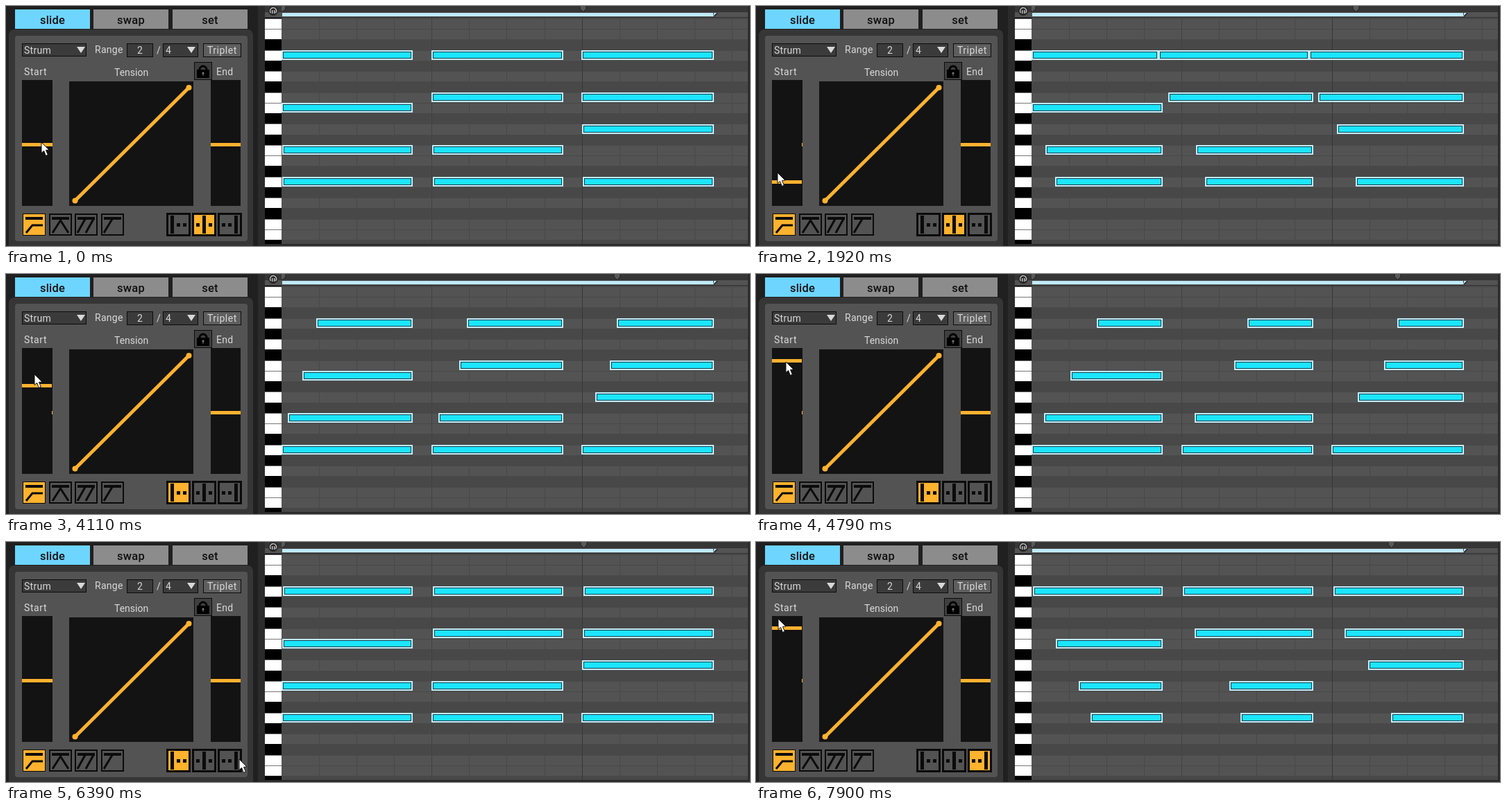
Animation, 1072 px wide and 347 px high, one loop 8 s. Source, as an HTML page with a canvas:

```html
<!DOCTYPE html>
<html lang="en">
<head>
<meta charset="utf-8">
<title>Strum panel</title>
<style>
html, body { margin: 0; width: 100%; height: 100%; overflow: hidden; background: #202020; }
canvas { display: block; }
</style>
</head>
<body>
<canvas id="stage" width="1072" height="347"></canvas>
<script>
const ctx = document.getElementById('stage').getContext('2d');
const LOOP = 8000;
const ORANGE = '#ffb22e', GRAY = '#535353', INK = '#0b0b0b', DARK = '#131313', LIGHT = '#d9d9d9';
const REST_Y = 200, HANDLE_LAG = 90;
const ROW = 15.25, GRID_X = 397;

// Each chord sounds four of these six pitches, counted in rows from the top note.
const pitches = [0, 4, 5, 7, 9, 12];
const chords = [[0, 2, 4, 5], [0, 1, 4, 5], [0, 1, 3, 5]]
  .map((voices, i) => ({ voices, start: 396 + 216.5 * i, end: 585.5 + 217 * i }));

// Strum offset of a voice at full drag: pivot at the middle, bottom or top.
const spread = {
  mid: i => 13.8 * (i - 2.5),
  left: i => 19 * (5 - i),
  right: i => 17.2 * i
};
const fullDrag = { mid: 54, left: -77, right: -76 };

// Where the pointer rests between and during drags: time, x, y
const pointerStops = [[0, 51, 197], [560, 50, 197], [1920, 31, 195], [2610, 38, 197],
  [3140, 249, 311], [3300, 248, 312], [3540, 34, 170], [3680, 40, 196], [4790, 43, 197],
  [5460, 29, 198], [5860, 30, 207], [6260, 336, 314], [6400, 324, 313],
  [6800, 24, 174], [7330, 36, 194], [7900, 32, 197]];

const smooth = k => k * k * (3 - 2 * k);
const mix = (a, b, k) => a + (b - a) * k;

// The picture refreshes at a steady pace, with one pause between two runs.
function lastRefresh(t) {
  if (t < 560) return 0;
  if (t < 4790) return 560 + 136 * Math.min(29, Math.floor((t - 560) / 136));
  return 4790 + 134 * Math.floor((t - 4790) / 134);
}

function wave(t, from, length, height, turns) {
  const k = (t - from) / length;
  return k > 0 && k < 1 ? height * Math.sin(Math.PI * 2 * turns * k) : 0;
}

const swing = t => wave(t, 560, 1610, -56, 1) + wave(t, 3740, 1600, -79, 0.5)
  + wave(t, 7440, 1070, -90, 0.5);

function pointerAt(t) {
  const i = Math.max(1, pointerStops.findIndex(stop => stop[0] > t));
  const [t0, x0, y0] = pointerStops[i - 1], [t1, x1, y1] = pointerStops[i];
  const k = smooth(Math.min(1, (t - t0) / (t1 - t0)));
  return [mix(x0, x1, k), mix(y0, y1, k) + swing(t)];
}

function rect(x, y, w, h, color) {
  ctx.fillStyle = color;
  ctx.fillRect(x, y, w, h);
}

function box(x, y, w, h, fill, border = 1) {
  rect(x, y, w, h, INK);
  rect(x + border, y + border, w - 2 * border, h - 2 * border, fill);
}

function round(x, y, w, h, r, color) {
  ctx.fillStyle = color;
  ctx.beginPath();
  ctx.roundRect(x, y, w, h, r);
  ctx.fill();
}

function trace(points) {
  ctx.beginPath();
  points.forEach(([x, y], i) => i ? ctx.lineTo(x, y) : ctx.moveTo(x, y));
}

function line(points, color, width) {
  trace(points);
  ctx.strokeStyle = color;
  ctx.lineWidth = width;
  ctx.stroke();
}

function shape(points, color) {
  trace(points);
  ctx.closePath();
  ctx.fillStyle = color;
  ctx.fill();
}

function disc(x, y, r, color) {
  ctx.fillStyle = color;
  ctx.beginPath();
  ctx.arc(x, y, r, 0, 7);
  ctx.fill();
}

function arc(x, y, r, from, to, color, width) {
  ctx.beginPath();
  ctx.arc(x, y, r, from, to);
  ctx.strokeStyle = color;
  ctx.lineWidth = width;
  ctx.stroke();
}

function text(s, x, y, { size = 14, weight = 400, color = LIGHT, align = 'left', gap = 0.3 } = {}) {
  ctx.font = `${weight} ${size}px Roboto, sans-serif`;
  ctx.letterSpacing = gap + 'px';
  ctx.textAlign = align;
  ctx.fillStyle = color;
  ctx.fillText(s, x, y);
}

function drawTabs() {
  ['slide', 'swap', 'set'].forEach((label, i) => {
    const x = Math.round(13 + 113.4 * i);
    rect(x, 5, 108, 28, i ? '#8c8c8c' : '#6dd5ff');
    text(label, x + 54, 26, { size: 16.5, weight: 500, color: '#101010', align: 'center', gap: 0.2 });
  });
}

function dropArrow(x) {
  shape([[x, 59], [x + 12, 59], [x + 6, 68]], LIGHT);
}

function drawControls() {
  box(23, 54, 93, 19, '#3b3b3b');
  text('Strum', 26, 68.5);
  dropArrow(102);
  text('Range', 128, 68);
  box(174, 54, 38, 20, '#3b3b3b');
  text('2', 193, 69, { align: 'center' });
  text('/', 217, 69);
  box(226, 54, 51, 20, '#3b3b3b');
  text('4', 230, 69);
  dropArrow(261);
  box(284, 54, 55, 20, '#5e5e5e');
  text('Triplet', 290, 69, { gap: 0.5 });
  text('Start', 26, 99.5, { gap: 0.6 });
  text('Tension', 156, 101, { gap: 0 });
  text('End', 303, 99.5);

  box(271, 81, 26, 26, '#3f3f3f');
  rect(275, 92, 18, 12, '#000');
  arc(284, 92, 5, Math.PI, 0, '#000', 3);
  disc(284, 97, 1.6, '#777');
  rect(283.5, 97, 1, 4, '#777');
}

function drawShapeButtons() {
  const strokes = [
    [[[5, 28], [14, 17], [29, 17]]],
    [[[5, 28], [16.5, 10], [28, 28]]],
    [[[4, 28], [15, 8]], [[16, 28], [27, 8]]],
    [[[4, 28], [16, 8]]]
  ];
  strokes.forEach((paths, i) => {
    const x = Math.round(24 + 37.7 * i);
    box(x, 300, 33, 32, i ? GRAY : ORANGE, i ? 2 : 1);
    rect(x + 4, 305, 25, 4, INK);
    for (const path of paths) line(path.map(([px, py]) => [x + px, 300 + py]), INK, 3);
  });
}

function drawAlignButtons(mode) {
  ['left', 'mid', 'right'].forEach((name, i) => {
    const x = 231 + 37 * i;
    box(x, 299, 35, 34, name === mode ? ORANGE : GRAY, 3);
    for (let slot = 0; slot < 3; slot++) {
      const sx = x + 6 + 9 * slot;
      slot === i ? rect(sx, 303, 5, 26, INK) : rect(sx, 314, 5, 5, INK);
    }
  });
}

function drawPanel(mode, handle) {
  round(4, 34, 352, 330, 8, '#363636');
  round(13, 43, 335, 297, 4, GRAY);
  drawTabs();
  drawControls();

  rect(23, 107, 44, 182, DARK);
  rect(91, 109, 179, 180, DARK);
  rect(295, 107, 43, 182, DARK);
  line([[99.5, 281.5], [263.5, 118]], ORANGE, 5);
  disc(99.5, 281.5, 4, ORANGE);
  disc(263.5, 118, 4, ORANGE);
  rect(295, 198, 43, 5, ORANGE);
  rect(66, 198, 1, 5, ORANGE);
  rect(23, Math.round(handle) - 2, 43, 5, ORANGE);

  drawShapeButtons();
  drawAlignButtons(mode);
}

function drawRoll() {
  rect(363, 0, 709, 347, '#2b2b2b');
  rect(373, 0, 696, 344, GRAY);
  for (let k = -4; k < 19; k++) {
    const y = Math.max(17, Math.round(63.5 + ROW * k));
    const h = Math.min(344, Math.round(63.5 + ROW * (k + 1))) - y;
    const black = [1, 3, 6, 8, 11].includes((k + 12) % 12);
    rect(373, y, 24, h, black ? '#000' : '#fff');
    rect(373, y, 24, 1, black ? '#000' : '#777');
    rect(GRID_X, y, 672, h, black ? '#484848' : GRAY);
    rect(GRID_X, y, 672, 1, '#494949');
  }
  for (let i = 1; i <= 12; i++) {
    const x = Math.round(396.5 + 54.15 * i);
    rect(x, 17, 1, 327, i === 8 ? '#363636' : i === 4 ? '#424242' : '#484848');
  }
  rect(373, 0, 696, 9, '#363636');
  rect(373, 16, 696, 1, '#333');
  rect(398, 10, 622, 5, '#bfeafb');
  shape([[1019, 10], [1026, 10], [1020, 16]], '#1c1c1c');
  shape([[1020, 10], [1024, 10], [1020, 14]], '#bfeafb');

  disc(385, 7, 7, '#262626');
  arc(385, 7, 4.5, 2.4, 7, '#bbb', 1.5);
  rect(383, 6, 1.5, 5, '#bbb');
  rect(386, 6, 1.5, 5, '#bbb');
}

function drawMarker(x) {
  const points = [[x - 4.5, -1], [x + 4.5, -1], [x + 4.5, 4], [x, 8.5], [x - 4.5, 4], [x - 4.5, -1]];
  shape(points, '#585858');
  line(points, '#1f1f1f', 1);
}

function drawNote(x, end, pitch) {
  const y = Math.round(63.8 + ROW * pitch);
  rect(x, y, end - x, 14, '#c3edfb');
  rect(x + 2, y + 2, end - x - 4, 10, '#123f4b');
  rect(x + 3, y + 3, end - x - 6, 8, '#1be5ff');
}

function drawNotes(t, mode, handle) {
  const drag = (handle - REST_Y) / fullDrag[mode];
  const idle = t < 560 ? spread.right : spread.left;
  const startOf = (chord, voice) =>
    Math.max(GRID_X, Math.round(chord.start + spread[mode](voice) * drag + idle(voice) * 0.027));

  chords.forEach((chord, i) => {
    const next = chords[i + 1];
    for (const voice of chord.voices) {
      const end = next && next.voices.includes(voice)
        ? Math.min(chord.end, startOf(next, voice)) : chord.end;
      drawNote(startOf(chord, voice), Math.round(end), pitches[voice]);
    }
  });
  const last = chords[2];
  drawMarker(Math.max(...last.voices.map(voice => startOf(last, voice))) + 0.5);

  ctx.save();
  ctx.beginPath();
  ctx.rect(GRID_X, 0, 12, 10);
  ctx.clip();
  drawMarker(398.5);
  ctx.restore();
}

function drawPointer([x, y]) {
  const points = [[0, 0], [0, 15.5], [3.6, 12.4], [6.4, 19.5], [9.4, 18.2], [6.5, 11.4], [11, 11], [0, 0]]
    .map(([px, py]) => [Math.round(x) + px, Math.round(y) + py]);
  shape(points, '#fff');
  line(points, '#111', 1);
}

function draw(now) {
  const t = lastRefresh(now % LOOP);
  const mode = t < 3280 ? 'mid' : t < 6390 ? 'left' : 'right';
  const handle = REST_Y + swing(t - HANDLE_LAG);
  rect(0, 0, 1072, 347, '#202020');
  drawPanel(mode, handle);
  drawRoll();
  drawNotes(t, mode, handle);
  drawPointer(pointerAt(t));
}

const origin = performance.now();
function frame() {
  draw(performance.now() - origin);
  requestAnimationFrame(frame);
}
frame();
</script>
</body>
</html>
```
